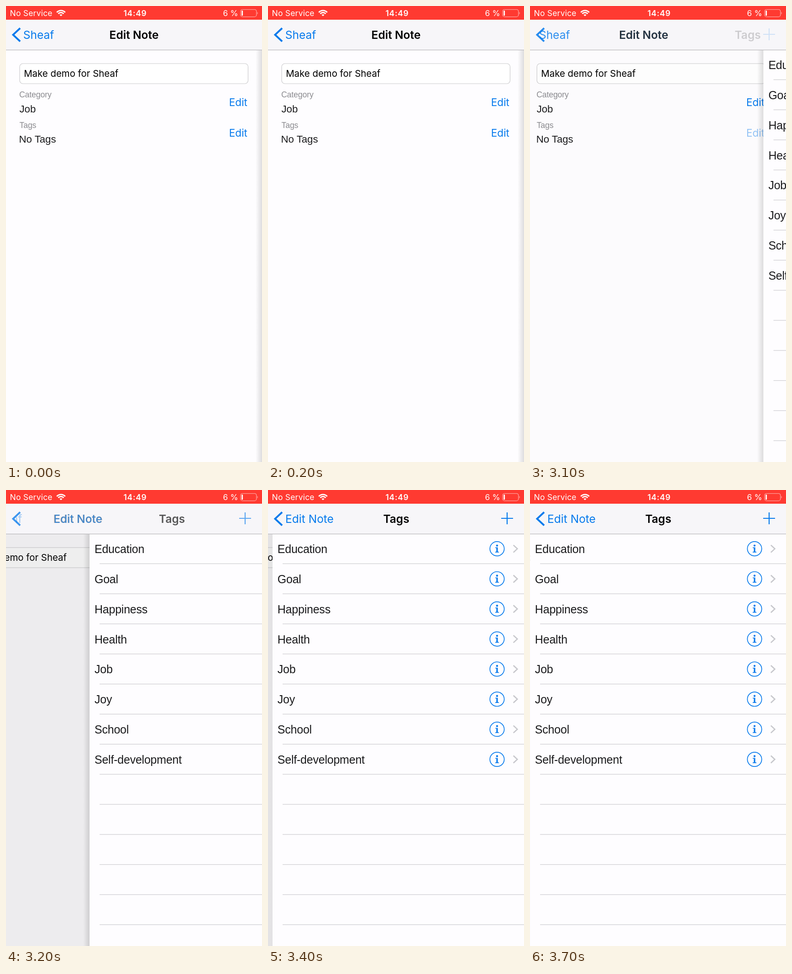
Animation of 561 by 998 pixels, one loop 8000 ms. Source, as an HTML page:

```html
<!DOCTYPE html>
<html lang="en">
<head>
<meta charset="utf-8">
<title>Edit Note</title>
<style>
  html, body { margin: 0; width: 100%; height: 100%; overflow: hidden; background: #fefdff; }
  svg { display: block; width: 561px; height: 998px; }
  text { font: 24.5px Inter, "Open Sans", sans-serif; white-space: pre; }
  .mid { text-anchor: middle; }
  .end { text-anchor: end; }
  .title { font-weight: 600; fill: #000; }
  .link { fill: #067aec; }
  .button { font-size: 22.6px; }
  .status { font-size: 17.5px; letter-spacing: .2px; fill: #fff; }
  .clock { font-weight: 600; letter-spacing: .7px; }
  .field { font-size: 20.4px; }
  .caption, .value, .row { font-family: "Liberation Sans", Arial, sans-serif; fill: #1a1a1c; }
  .caption { font-size: 17.7px; letter-spacing: -.15px; fill: #8c8c90; }
  .value { font-size: 22.2px; }
  .row { font-size: 25px; letter-spacing: -.22px; }
  .line { fill: none; stroke: #067aec; }
</style>
</head>
<body>
<svg viewBox="0 0 561 998">
  <defs>
    <linearGradient id="shade">
      <stop offset="0" stop-color="#000" stop-opacity="0"/>
      <stop offset="1" stop-color="#000" stop-opacity=".13"/>
    </linearGradient>
    <clipPath id="labelClip"><path d="M22 30H561V96H22z"/></clipPath>
    <g id="info" fill="#067aec">
      <circle class="line" r="15.7" stroke-width="1.7"/>
      <circle cy="-7" r="2.2"/>
      <path d="M-4 -3H1.6V6.2L4.2 7V8.2H-4.2V7L-1.6 6.2V-1.2L-4 -1.8z"/>
    </g>
  </defs>

  <rect width="561" height="998" fill="#fefdff"/>

  <g id="note">
    <rect x="30" y="126" width="500.5" height="44" rx="7" fill="#fff" stroke="#cbcbcd" stroke-width="1.2"/>
    <text class="field" x="39.2" y="155">Make demo for Sheaf</text>
    <text class="caption" x="29" y="200">Category</text>
    <text class="value" x="29.5" y="232.5">Job</text>
    <text class="caption" x="29.5" y="266.5">Tags</text>
    <text class="value" x="28.5" y="299">No Tags</text>
    <text class="link button end" x="529" y="219">Edit</text>
    <text class="link button end" x="529" y="285.5" id="tapped">Edit</text>
  </g>
  <rect id="dim" y="96" width="561" height="902"/>

  <g id="panel">
    <rect x="-14" y="96" width="14" height="902" fill="url(#shade)" id="edge"/>
    <rect y="96" width="561" height="902" fill="#fefdff"/>
    <g id="rows"></g>
  </g>

  <rect y="30" width="561" height="66" fill="#f7f6f9"/>
  <rect y="95.7" width="561" height="1.2" fill="#b7b6b9"/>
  <g clip-path="url(#labelClip)">
    <text class="link" x="37.8" y="71.7" id="oldBack">Sheaf</text>
  </g>
  <path id="chevron" class="line" stroke-width="3.9" d="M31 48.5L15.5 63L31 77.5"/>
  <text class="title mid" y="71.7" id="oldTitle">Edit Note</text>
  <text class="link mid" y="71.7" id="newBack">Edit Note</text>
  <text class="title mid" y="71.7" id="newTitle">Tags</text>
  <path id="plus" class="line" stroke-width="2.2" d="M511 62H537M524 49V75"/>

  <rect width="561" height="30" fill="#ff3a31"/>
  <text class="status" x="8.6" y="22">No Service</text>
  <g transform="translate(120.5 22.3)" fill="none" stroke="#fff" stroke-width="2.9">
    <path d="M-9.2 -8.3A12.4 12.4 0 0 1 9.2 -8.3M-5.9 -5.3A7.9 7.9 0 0 1 5.9 -5.3"/>
    <path d="M0 0L-3.1 -2.8A4.2 4.2 0 0 1 3.1 -2.8z" fill="#fff" stroke="none"/>
  </g>
  <text class="status clock mid" x="283" y="22">14:49</text>
  <text class="status end" x="509" y="22">6 %</text>
  <rect x="514.2" y="7.6" width="34.6" height="16" rx="4.2" fill="none" stroke="#fff" stroke-opacity=".5" stroke-width="1.4"/>
  <path d="M550.5 12.8Q553.5 15.6 550.5 18.4z" fill="#fff" fill-opacity=".5"/>
  <rect x="516.3" y="10" width="2.8" height="11.3" rx="1" fill="#fff"/>
</svg>
<script>
const $ = id => document.getElementById(id);
const clamp = v => Math.min(1, Math.max(0, v));
const attr = (id, name, value) => $(id).setAttribute(name, value);
const slide = (id, x) => attr(id, 'transform', `translate(${x} 0)`);
const fade = (id, v) => attr(id, 'opacity', v);

const LOOP = 8000, STEP = 100, TAP = 3000, PUSH = 3073, WIDTH = 561, PITCH = 65.84;
const tags = ['Education', 'Goal', 'Happiness', 'Health', 'Job', 'Joy', 'School', 'Self-development'];

let rows = '';
for (let i = 0; i < 13; i++) {
  const y = i * PITCH;
  rows += `<rect x="22" y="${160.7 + y}" width="539" height="1.2" fill="#cdccd0"/>`;
  if (tags[i]) rows += `<text class="row" x="10.8" y="${138 + y}">${tags[i]}</text>
    <use href="#info" x="492" y="${128.6 + y}"/>
    <path d="M527.8 ${120.6 + y}l8.6 8l-8.6 8" fill="none" stroke="#c7c7cc" stroke-width="2.6"/>`;
}
$('rows').innerHTML = rows;

function draw(t) {
  // Critically damped spring for the page, quadratic ease-out for the bar.
  const s = Math.max(0, t - PUSH) * .01826;
  const left = (1 + s) * Math.exp(-s);
  const bar = 1 - (1 - clamp((t - PUSH) / 312)) ** 2;

  slide('panel', WIDTH * left);
  slide('note', -.3 * WIDTH * (1 - left));
  fade('dim', .1 * (1 - left));
  fade('edge', clamp(left * 4));
  fade('tapped', t < TAP ? 1 : .2 + .8 * clamp((t - TAP) / 350));

  slide('oldBack', -108 * bar);
  fade('oldBack', 1 - bar);
  fade('chevron', 1 - bar * (1 - bar));
  attr('oldTitle', 'x', 280.5 - 189.5 * bar);
  attr('newBack', 'x', 280.5 - 189.5 * bar);
  attr('newTitle', 'x', 281 + 235 * (1 - bar));
  fade('oldTitle', 1 - bar);
  for (const id of ['newBack', 'newTitle', 'plus']) fade(id, bar);
}

function tick() {
  const t = performance.now() % LOOP;
  draw(Math.floor(t / STEP) * STEP);
  requestAnimationFrame(tick);
}
tick();
</script>
</body>
</html>
```
